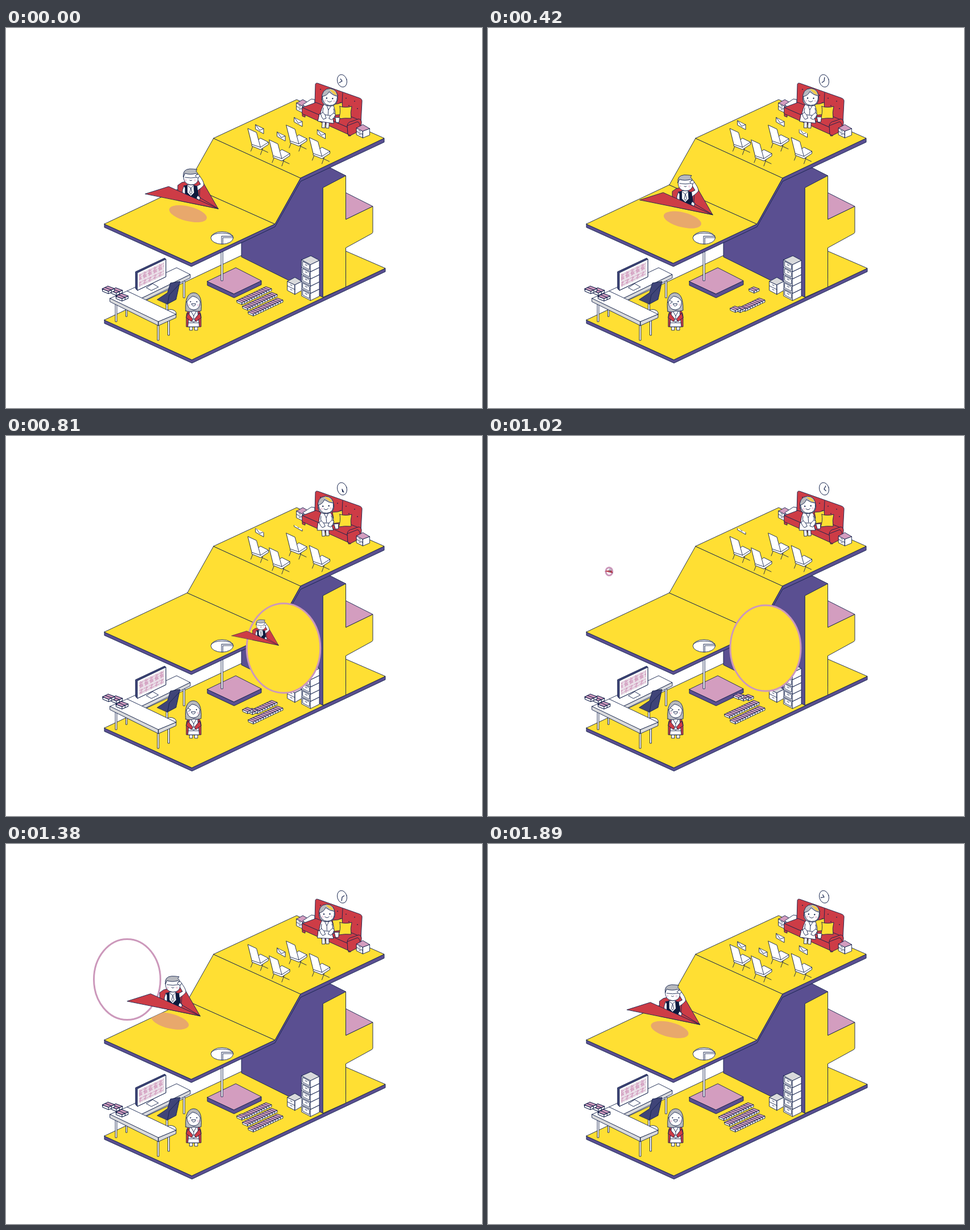
An HTML page for the animation above (1920 ms loop, 837 px wide and 669 px high).

```html
<!DOCTYPE html>
<html lang="en">
<head>
<meta charset="utf-8">
<title>Isometric office</title>
<style>
  html, body { margin: 0; width: 100%; height: 100%; overflow: hidden; background: #fff; }
  svg { display: block; width: 100vw; height: 100vh; }
  .y { fill: #ffdf33; } .p { fill: #5a4f91; } .r { fill: #cd3c46; } .k { fill: #d39dbf; }
  .n { fill: #3f4478; } .g { fill: #d9dadc; } .h { fill: #b7b9bf; } .d { fill: #0d1a3c; }
  .w { fill: #fff; } .o { fill: none; }
  .dot { fill: #15234d; stroke: none; } .blush { fill: #f1d6e4; stroke: none; }
  .ring { stroke: #cc98bb; stroke-width: 3; }
</style>
</head>
<body>
<svg viewBox="0 0 837 669" stroke="#15234d" stroke-width=".9" stroke-linejoin="round" stroke-linecap="round">
  <defs>
    <clipPath id="floorClip"><path d="M173 345L319 276L473 345L326 414Z"/></clipPath>
    <clipPath id="slot"><path d="M-8 -9L8 -1V30H-8Z"/></clipPath>
    <clipPath id="screenClip"><path d="M3 2H47V28H3Z"/></clipPath>
    <g id="box">
      <path class="w" d="M-9 -.7L0 3V6.5L-8.5 3ZM0 3L9 -1V2.500L0 6.500Z"/>
      <path class="k" d="M-9 -.7L-1 -4.700L9 -1L0 3Z"/>
      <path class="o" d="M-5 -2.700L4.500 1V4"/>
    </g>
    <g id="mail">
      <path class="w" d="M-7 -8L7 -1V8L-7 0Z"/>
      <path class="o" d="M-7 -8L0 2L7 -1"/>
    </g>
    <g id="seat">
      <path class="o" d="M10 27L5 40M27 32L22 46M16 33L35 42"/>
      <path class="w" d="M7 28L22 17L36 24V28L22 37L7 31Z"/>
      <path class="o" d="M22 33L36 24"/>
      <path class="w" d="M0 0L15 7L22 33L7 28Z"/>
    </g>
    <g id="drawer">
      <path class="w" d="M0 0L15.500 8.500V21L0 13Z"/>
      <path class="w" d="M15.500 8.500L31 1V13.500L15.500 21Z"/>
      <path class="o" d="M2 3L13.500 9.500V17.500L2 11.500ZM6 8.500L9.500 10.300"/>
    </g>
    <g id="nightstand">
      <path class="w" d="M0 0L11 5.500V17.500L0 12ZM11 5.500L23 1V12.500L11 17.500Z"/>
      <path class="k" d="M0 0L11 -6L23 1L11 5.500Z"/>
      <path class="o" d="M0 6L11 11.500M4 4.500L7 6M4 10.500L7 12"/>
    </g>
  </defs>

  <!-- ground floor -->
  <path class="p" d="M173 514V520L327 590L667 429V423L327 584Z"/>
  <path class="y" d="M173 514L416 399.500L598 393L667 423L327 584Z"/>
  <path class="p" d="M414 370V403L557 474L597.500 440V260L570 246L500 250L440 350Z"/>
  <path class="k" d="M597.500 290L645 314L597.500 337Z"/>
  <path class="y" d="M557.500 281L597.500 260V337L645 314V359Q645 361 643 362L597.500 387V456L557.500 474Z"/>

  <!-- pedestal -->
  <path class="p" d="M354 446V453L401 475L449 452V445L401 468Z"/>
  <path class="k" d="M354 446L404 422L449 445L401 468Z"/>
  <path class="w" d="M378.500 368H381.300V445H378.500Z"/>

  <!-- filing cabinets -->
  <g id="cabinets"></g>
  <path class="g" d="M520 408L536 401L551 409L535.500 416.500Z"/>
  <path class="w" d="M495 446L508 452V469L495 462ZM508 452L520 446V462L508 469Z"/>
  <path class="g" d="M495 446L508 439L520 446L508 452Z"/>
  <path class="o" d="M495 454L508 460.500M500 452L503 453.500M500 460L503 461.500"/>

  <g id="boxes"></g>

  <!-- desk -->
  <g class="w">
    <path d="M312 442H314.500V475H312ZM211 486H213V508H211Z"/>
    <path d="M213 463L300 422L324 434L238 476Z"/>
    <path class="g" d="M238 476L324 434V440L243 480Z"/>
    <path d="M282 484H284.500V499H282Z"/>
    <path d="M278 500Q288 492 297 498Q303 504 294 510Q285 512 278 506Z"/>
    <path class="n" d="M266 478L284 466L289 449L306 446L299 478L284 486Z"/>
    <path class="o" d="M284 486L287 470L304 452"/>
    <path d="M192.500 482H195V517H192.500ZM266.500 520H269V550H266.500ZM285 512H287.500V541H285Z"/>
    <path d="M183 476L213 463L299 504L268 517Z"/>
    <path class="g" d="M183 476L268 517V524L183 482ZM268 517L299 504V510L268 524Z"/>
    <path d="M247 457L258 450L268 456L256 462Z"/>
  </g>
  <path class="n" d="M228 429L279 405L281 407V438L231 462L228 459Z"/>
  <g transform="matrix(1 -.48 0 1 231 431)">
    <path class="w" d="M0 0H50V31H0Z"/>
    <path d="M3 3H47V27H3Z" fill="#eadfe8" stroke="none"/>
    <g clip-path="url(#screenClip)"><g id="glyphs" class="o" stroke="#d39dbf" stroke-width="1.100"></g></g>
  </g>
  <use href="#box" transform="translate(204 473) scale(1.2)"/>
  <use href="#box" transform="translate(194 463) scale(1.2)"/>
  <use id="looseBox" href="#box"/>

  <!-- standing woman -->
  <path class="w" d="M323 524H328V532H323ZM332 524H337V532H332Z"/>
  <path class="r" d="M322 497Q317 500 317 509V526H343V509Q343 500 338 497Z"/>
  <path class="w" d="M323 498H337L340 526H320Z"/>
  <path class="o" d="M320 519H340M325 498L330 507L335 498M330 507V513"/>
  <path class="r" d="M320 502L329 513L326 517L317 510ZM340 502L331 513L334 517L343 510Z"/>
  <circle class="w" cx="330" cy="515" r="2.600"/>
  <g id="lowerHead">
    <path class="h" d="M316 498Q314 467 330 466Q346 467 343 498Q336 500 330 498Q323 501 316 498Z"/>
    <path class="w" d="M318 482Q321 477 328 472Q338 474 341.500 482Q341 496 330 496Q319 496 318 482Z"/>
    <circle class="blush" cx="322" cy="488" r="2"/><circle class="blush" cx="338" cy="488" r="2"/>
    <circle class="dot" cx="335.500" cy="482" r="1.100"/>
    <circle class="dot" id="eye" cx="324.500" cy="482" r="1.100"/>
    <path class="o" id="wink" d="M321 479L325.500 482L321 484.500"/>
    <path class="w" d="M326.500 485.500H333.500Q333 489.500 330 489.500Q327 489.500 326.500 485.500Z"/>
  </g>

  <!-- upper storey -->
  <path class="p" d="M173 345V351L326 420L473 350L518 270L665 201V194L518 264L473 345L326 414Z"/>
  <path class="y" d="M173 345L319 276L473 345L326 414Z"/>
  <path class="y" d="M319 276L365 194L518 264L473 345Z"/>
  <path class="y" d="M365 194L511 126L665 194L518 264Z"/>
  <g clip-path="url(#floorClip)">
    <g id="shadow"><ellipse cx="-53" cy="9" rx="34" ry="13" transform="rotate(14 -53 9)" fill="#e8a86c" stroke="none"/></g>
  </g>
  <ellipse class="w" cx="380" cy="369.500" rx="19.700" ry="11"/>
  <path class="o" d="M361 367Q365 361 380 361Q395 361 399 367M399 366.500H379V380.500M399 369H381.300V380.500"/>

  <!-- lounge -->
  <ellipse class="w" cx="591" cy="93" rx="8.300" ry="11.200" transform="rotate(-15 591 93)"/>
  <path class="o" id="hands" stroke-width="1.200"/>
  <use href="#nightstand" x="511" y="132"/>
  <path class="w" d="M522 135L537 125L543 126V134L530 141Z"/>
  <path class="r" d="M543 133L544 99Q545 96 549 97.500L621 123Q627 125 626 130L624 168L600 176Z"/>
  <path class="o" d="M592 114L590 152"/>
  <g id="buttons"></g>
  <path class="r" d="M521 150V155L526 157V152ZM602 185V190H606V184Z"/>
  <path class="r" d="M521 140L545 131L624 163L601 175Z"/>
  <path class="r" d="M521 140L601 175V187L521 151Z"/>
  <path class="y" d="M574 134Q583 135 591 131Q591 142 594 153Q583 152 575 154Q577 144 574 134Z"/>
  <path class="y" d="M587 138Q597 141 608 138Q605 149 607 159Q595 158 585 160Q589 149 587 138Z"/>
  <path class="r" d="M601 187L600 172Q601 165 609 164L620 160Q626 161 625 168L622 181L606 189Z"/>
  <path class="o" d="M600 172L618 165Q623 166 623 178"/>
  <use href="#nightstand" x="616.500" y="176"/>
  <g id="mails"></g>
  <use href="#seat" x="493" y="171"/><use href="#seat" x="425.500" y="177"/>
  <use href="#seat" x="533.500" y="193"/><use href="#seat" x="463" y="197"/>
  <g id="sitter">
    <path class="w" d="M578 156H586L585 165H580Z"/>
    <path class="w" d="M557 134Q552 142 551 155L577 158Q579 146 573 135Z"/>
    <path class="w" d="M556 163H561V176H556ZM563 163H568V176H563Z"/>
    <path class="w" d="M550 152L573 154L576 167L548 165Z"/>
    <path class="o" d="M561 135L565 144L570 135M565 144V152M556 141Q553 151 560 155M574 141Q578 150 570 156"/>
    <path class="w" d="M556 149Q561 153 562 159L557 161Q553 157 552 152ZM575 149Q568 153 567 159L572 161Q576 157 578 152Z"/>
    <path class="h" d="M552 126Q550 107 566 106Q580 107 580 124Q579 137 566 137Q553 137 552 126Z"/>
    <path d="M564 108Q573 106 578 117L573 116Z" fill="#f4cb4a" stroke="none"/>
    <path class="w" d="M553 121Q561 119 564 112Q571 118 579 119Q580 136 566 136Q554 135 553 121Z"/>
    <circle class="blush" cx="558" cy="128" r="2"/><circle class="blush" cx="574" cy="128" r="2"/>
    <circle class="dot" cx="560.500" cy="123.500" r="1.200"/><circle class="dot" cx="571" cy="123.500" r="1.200"/>
    <path class="o" d="M562 128Q566 132 569.500 128"/>
  </g>

  <!-- portals and flyer, whose nose is at its own 0,0 -->
  <ellipse id="exit" class="ring o" cx="213" cy="238.500"/>
  <ellipse id="entry" class="ring y" cx="488" cy="373.500"/>
  <g id="flyer">
    <path class="r" d="M-71 -15V-41L-64 -46L-31 -54L0 0Z"/>
    <path class="o" d="M-31 -54L-33 -20"/>
    <path class="d" d="M-60 -40Q-48 -44 -36 -39L-34 -16H-62Z"/>
    <path class="w" d="M-54 -42H-43L-42 -28L-48 -22L-54 -28Z"/>
    <path class="o" d="M-53 -40L-48 -36L-44 -40M-48 -36L-50 -28L-48 -25L-46 -28Z"/>
    <path class="w" d="M-60 -40Q-64 -33 -63 -24L-58 -22V-36Z"/>
    <path class="w" d="M-37 -40L-31 -43L-37 -53L-33 -58Q-25 -48 -25 -42Q-27 -38 -36 -32Z"/>
    <path class="w" d="M-36 -23L-31 -20L-33 -15L-38 -18Z"/>
    <path class="w" d="M-61 -57Q-60 -68 -48 -68Q-35 -67 -35 -54Q-35 -42 -48 -42Q-61 -43 -61 -57Z"/>
    <path class="h" d="M-61 -56Q-63 -69 -50 -70Q-43 -70 -37 -69L-39 -66Q-35 -63 -36 -59L-39 -62Q-49 -59 -58 -62Z"/>
    <circle class="blush" cx="-57" cy="-50" r="2"/><circle class="blush" cx="-41" cy="-50" r="2"/>
    <path class="o" d="M-58 -55L-48 -54L-38 -55M-50 -50Q-48 -48 -46 -50"/>
    <path class="w" d="M-40 -58L-35 -61L-32 -57L-36 -54Z"/>
    <path class="r" d="M-128 -26L-87 -39L0 0Z"/>
    <path class="o" d="M-33 -20L0 0"/>
  </g>
</svg>

<script>
const LOOP = 1920, STEP = 30;
const $ = id => document.getElementById(id);

function add(parent, tag, attrs) {
  const el = document.createElementNS('http://www.w3.org/2000/svg', tag);
  for (const name in attrs) el.setAttribute(name, attrs[name]);
  return parent.appendChild(el);
}
const set = (el, transform) => el.setAttribute('transform', transform);
const show = (el, on) => el.setAttribute('visibility', on ? 'visible' : 'hidden');
const clamp = v => Math.max(0, Math.min(1, v));

// Straight interpolation through [time, value] pairs
function track(keys, t) {
  if (t <= keys[0][0]) return keys[0][1];
  for (let i = 1; i < keys.length; i++) {
    const [a, u] = keys[i - 1], [b, v] = keys[i];
    if (t <= b) return u + (v - u) * (t - a) / (b - a);
  }
  return keys[keys.length - 1][1];
}

// Smooth curve through the same kind of pairs
function curve(keys, t) {
  let i = 0;
  while (i < keys.length - 2 && t > keys[i + 1][0]) i++;
  const slope = j => {
    const a = keys[Math.max(0, j - 1)], b = keys[Math.min(keys.length - 1, j + 1)];
    return (b[1] - a[1]) / (b[0] - a[0]);
  };
  const [a, u] = keys[i], [b, v] = keys[i + 1], d = b - a, s = clamp((t - a) / d);
  return u + (v - u) * s * s * (3 - 2 * s)
    + d * s * (1 - s) * (slope(i) * (1 - s) - slope(i + 1) * s);
}

for (let i = 4; i >= 0; i--) add($('cabinets'), 'use', { href: '#drawer', x: 520, y: 408 + i * 12.7 });

for (let i = 0; i < 10; i++) {
  const col = i % 5, row = i < 5 ? 0 : 1;
  add($('buttons'), 'circle', { class: 'dot', r: .9, cx: 553 + col * 15 + row * 5, cy: 108 + col * 5.2 + row * 13 });
}

for (let x = 0; x < 60; x += 9) {
  add($('glyphs'), 'path', { d: `M${x} 6h7l-6 4h6l-5 4h5M${x + 3} 4v11M${x + 1} 11l6 2` });
  add($('glyphs'), 'path', { d: `M${x} 19h7l-6 5h7M${x + 4} 18v8` });
}

// Front row fills first, each row from right to left
const boxes = [];
for (let row = 0; row < 3; row++) {
  for (let i = 0; i < 6; i++) {
    boxes.push({
      x: 458 + row * 10 - i * 8.6, y: 460 + row * 10 + i * 4.1,
      start: [860, 400, 40][row] + i * [75, 75, 65][row],
      el: add($('boxes'), 'use', { href: '#box' })
    });
  }
}

const mails = [[446, 171, 1840], [514, 165.5, 1610], [484, 191, 1150], [554.5, 187, 1400]].map(([x, y, start]) => {
  const slot = add($('mails'), 'g', { transform: `translate(${x} ${y})`, 'clip-path': 'url(#slot)' });
  return { start, el: add(slot, 'use', { href: '#mail' }) };
});

const NOSE = [[1000, 269], [1020, 273], [1230, 311], [1530, 365], [1890, 372.5], [1920, 373],
  [2340, 395], [2580, 442], [2740, 505], [2820, 548]];
const FLYER_SIZE = [[1000, 0], [1020, .11], [1140, 1], [2680, 1], [2820, 0]];
const ENTRY = [[600, 0], [660, .29], [800, 1.05], [880, 1], [1120, 1], [1230, .73], [1360, 0]];
const EXIT = [[1000, 0], [1020, .1], [1140, 1.08], [1230, 1], [1580, 1], [1650, .78], [1740, 0]];

function portal(el, size, rx, ry) {
  el.setAttribute('rx', rx * size);
  el.setAttribute('ry', ry * size);
  show(el, size > 0);
}

function hand(degrees, length) {
  const a = degrees * Math.PI / 180;
  return `M591 93.500l${Math.sin(a) * length * .85} ${-Math.cos(a) * length}`;
}

function draw(t) {
  const p = t / LOOP, angle = p * 2 * Math.PI;

  const ft = t < 950 ? t + LOOP : t;
  const x = curve(NOSE, ft), y = 318 + (x - 373) * .484, size = track(FLYER_SIZE, ft);
  const place = `translate(${x - 60} ${y - 32}) scale(${size}) translate(60 32)`;
  for (const el of [$('flyer'), $('shadow')]) {
    set(el, place);
    show(el, size > 0);
  }
  portal($('entry'), track(ENTRY, t), 62, 75.5);
  portal($('exit'), track(EXIT, t), 58.5, 71);

  $('hands').setAttribute('d', hand(320 - 360 * p, 5) + hand(245 - 1080 * p, 6.5));
  set($('sitter'), `rotate(${4 * Math.tanh(2.5 * Math.cos(angle))} 562 172)`);

  const wink = t > 270 && t < 1110;
  show($('wink'), wink);
  show($('eye'), !wink);
  set($('lowerHead'), `rotate(${-4 * track([[200, 0], [380, 1], [660, .9], [1000, 0]], t)} 330 498)`);

  set($('looseBox'), `translate(${180.5 - .5 * Math.cos(angle * 3)} 460) scale(1.2)`);
  set($('glyphs'), `translate(${-9 * ((p * 4) % 1)} 0)`);

  const bt = t < STEP ? t + LOOP : t;
  for (const b of boxes) {
    const s = clamp((bt - b.start) / 200);
    set(b.el, `translate(${b.x} ${b.y - 12 * (1 - s) ** 2})`);
    show(b.el, bt >= b.start);
  }

  for (const m of mails) {
    const age = (t - m.start + LOOP) % LOOP;
    set(m.el, `translate(0 ${12 * (1 - clamp(age / 200)) - 6 * clamp((age - 820) / 300)})`);
    show(m.el, age < 1140);
  }
}

const begin = performance.now();
function tick() {
  const t = (performance.now() - begin) % LOOP;
  draw(Math.floor(t / STEP) * STEP);
  requestAnimationFrame(tick);
}
tick();
</script>
</body>
</html>
```
